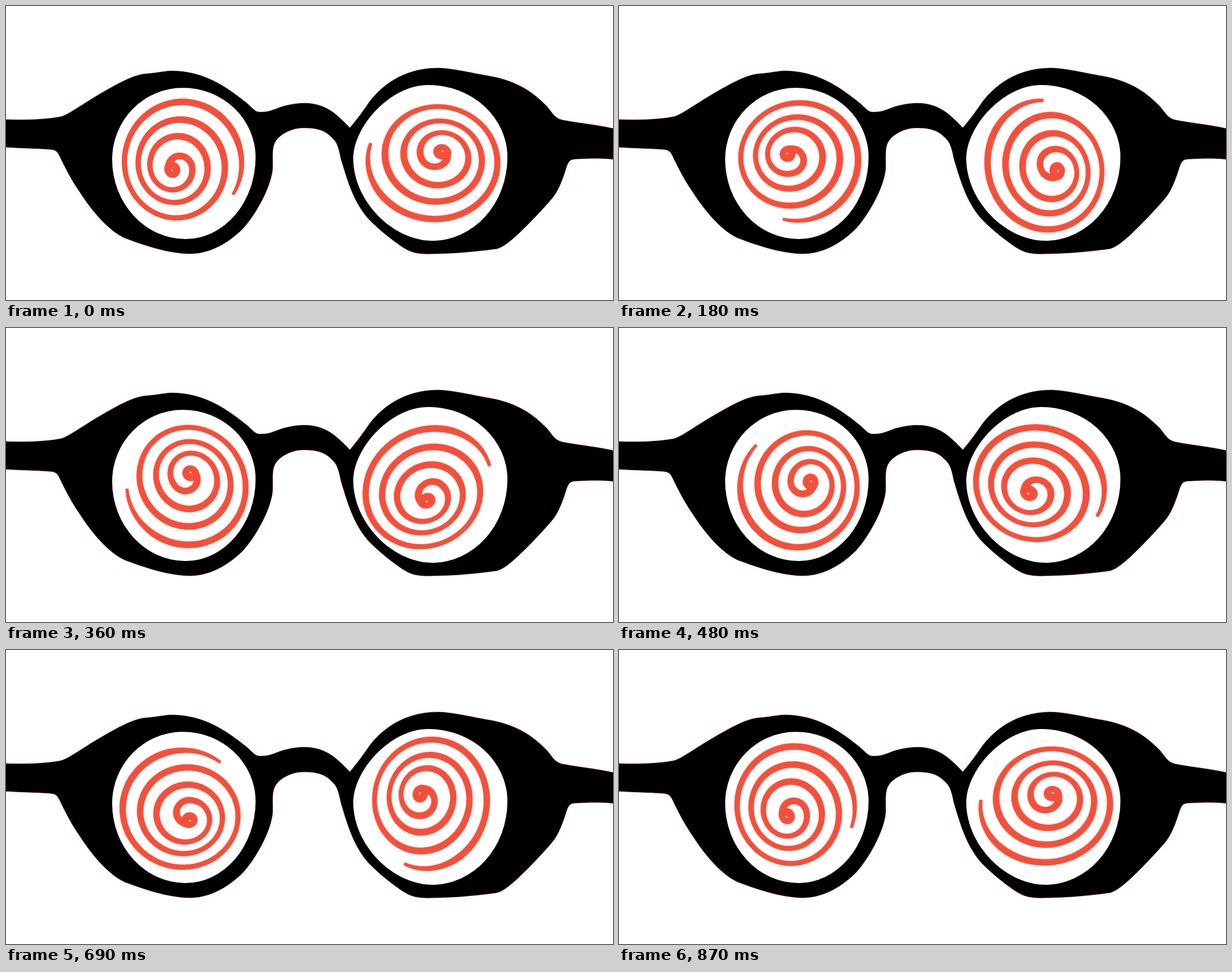
An HTML page for the animation above (900 ms loop, 1075 by 521 pixels).

```html
<!DOCTYPE html>
<html lang="en">
<head>
<meta charset="utf-8">
<title>Hypnotic glasses</title>
<style>
  html, body { margin: 0; width: 100%; height: 100%; overflow: hidden; background: #fff; }
  svg { display: block; width: 100%; height: 100%; }
  .rims { fill: #000; stroke: #d8402f; stroke-width: 1; paint-order: stroke; }
  .lens { fill: #fff; }
  .swirl { fill: #f3503c; }
  .spin { transform-origin: 0 0; animation: spin .9s steps(30) -1ms infinite; }
  @keyframes spin { to { transform: rotate(360deg); } }
</style>
</head>
<body>
<svg viewBox="0 0 1075 521">
  <path class="rims" d="M-4 201C30 203 75 201 98 196C115 191 140 169 200 137
    C222 126 235 121 250 120S285 115 292 115C350 115 390 143 425 171
    C437 181 441 188 449 188C465 189 475 183 490 178C535 166 562 174 585 193
    Q597 203 609 216Q627 195 645 168C680 124 725 110 765 110
    C790 110 830 120 855 124C912 134 938 158 958 178C968 190 972 199 985 202
    C1015 208 1045 210 1079 218V272C1055 269 1030 270 1012 271
    C998 271 997 275 993 284C985 310 977 330 966 342C950 361 925 387 905 406
    C893 416 883 426 870 430C835 435 790 439 755 439C735 440 720 438 707 430
    C690 420 655 392 640 375C615 345 605 310 593 270C588 245 585 240 575 231
    C560 216 540 216 525 216S485 225 476 242C470 255 473 270 472 290
    C468 325 440 372 420 394C390 424 357 439 325 439C285 438 245 424 210 411
    C180 397 150 360 131 330C118 312 104 285 96 268C91 257 88 255 78 254
    C50 252 25 252 -4 250Z"/>
  <path class="lens" d="M313 145A129 123 0 0 1 442 268A124 145 0 0 1 318 413A130 141 0 0 1 188 272A125 127 0 0 1 313 145Z"/>
  <path class="lens" d="M748 140A140 128 0 0 1 888 268A133 148 0 0 1 755 416C685 416 615 346 615 270C615 214 680 140 748 140Z"/>
  <g transform="translate(316 279)"><g class="spin"><path class="swirl"/></g></g>
  <g transform="translate(751 278)"><g class="spin">
    <g transform="rotate(165.6) translate(-2.5 3.5) rotate(15) scale(1.1 .96) rotate(-15)"><path class="swirl"/></g>
  </g></g>
</svg>
<script>
const RAD = Math.PI / 180, START = 29, TURN = 1560, STEP = 5;

const ease = (from, to, v) => {
  const t = Math.min(1, Math.max(0, (v - from) / (to - from)));
  return t * t * (3 - 2 * t);
};

// Point of the spiral after winding a degrees inwards from its tail
function spiral(a) {
  const s = a / TURN, phi = (START - a) * RAD;
  const coil = 118 - .091 * a + 1.35e-5 * a * a - 9.5 * Math.exp(-a / 35);
  const r = coil + (9 - coil) * ease(1110, 1270, a);
  return [
    -6.8 - 17.2 * s + .975 * r * Math.cos(phi),
    1.2 + 11.8 * s * s + 1.03 * r * Math.sin(phi)
  ];
}

// Brush width: thin tail, fuller on one side, heavy at the core
function brush(a) {
  const full = 10.5 + 1.5 * Math.cos((START - a + 50) * RAD) + 2.5 * ease(1150, 1300, a);
  return Math.min(full, 5.5 + a * .12);
}

const left = [], right = [];
for (let a = 0; a <= TURN; a += STEP) {
  const [x, y] = spiral(a), [px, py] = spiral(a - 1), [qx, qy] = spiral(a + 1);
  const k = brush(a) / 2 / Math.hypot(qx - px, qy - py);
  const nx = (py - qy) * k, ny = (qx - px) * k;
  left.push([x + nx, y + ny]);
  right.unshift([x - nx, y - ny]);
}
const edge = [...left, ...right].map(p => p.map(v => v.toFixed(2)).join(' '));
document.querySelectorAll('.swirl').forEach(el => el.setAttribute('d', `M${edge.join('L')}Z`));
</script>
</body>
</html>
```
